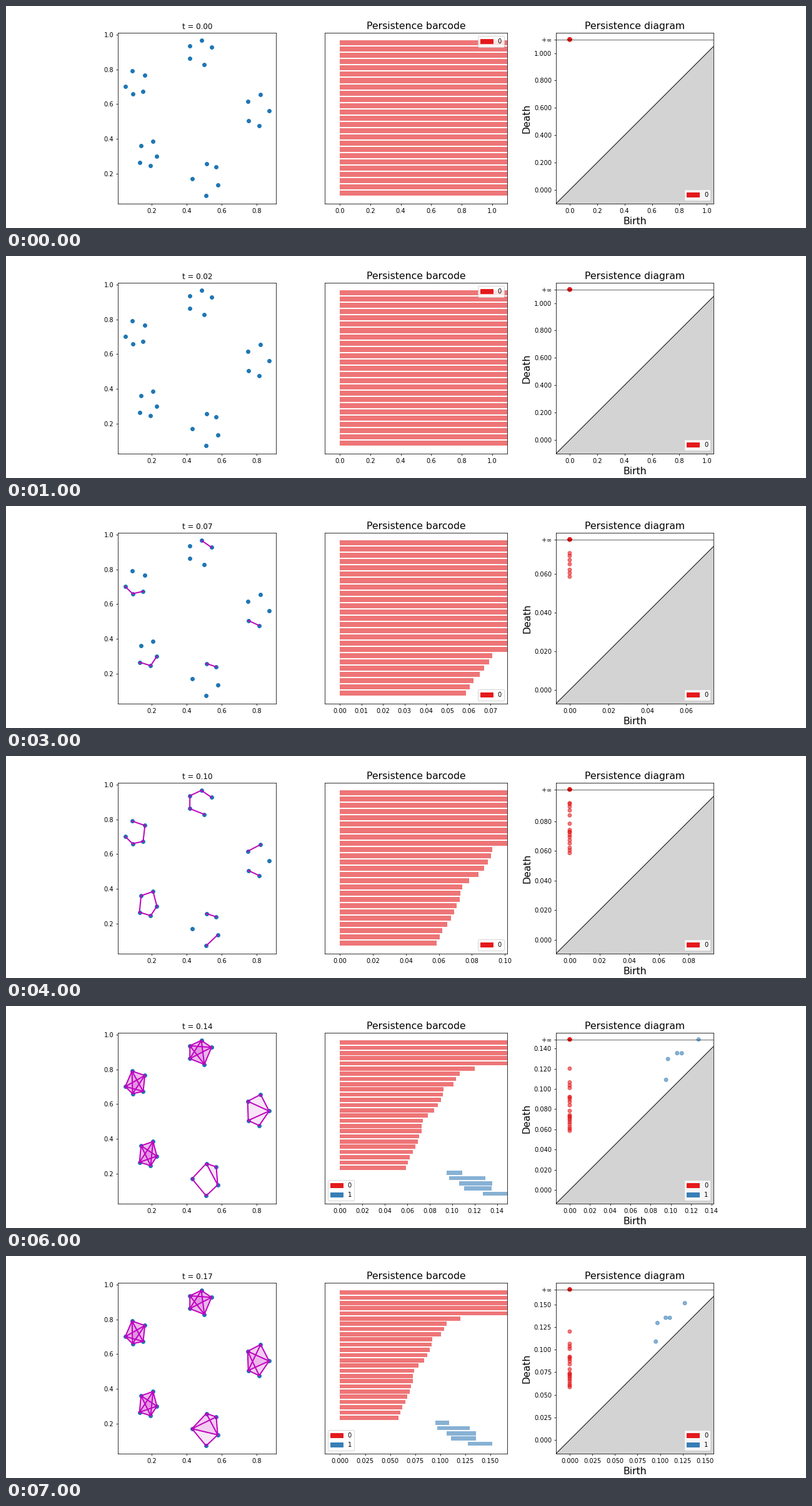
A matplotlib script that plays this animation: 1280x356 px, repeating every 8 s.

```python
from itertools import combinations

import matplotlib.pyplot as plt
import numpy as np
from matplotlib.animation import FuncAnimation
from matplotlib.patches import Patch, Polygon

plt.rcParams["font.family"] = "DejaVu Sans"

WIDTH, HEIGHT = 1280, 356
DPI = WIDTH / 18
STEP = 0.0241
FRAMES = 8
COLORS = plt.cm.Set1.colors

# Five rings of five points, each listed around its ring; all else follows from them
RINGS = np.array([
    [(.0856, .7899), (.1598, .7648), (.1497, .6732), (.0890, .6600), (.0470, .7008)],
    [(.4837, .9664), (.5420, .9264), (.5010, .8284), (.4175, .8614), (.4180, .9355)],
    [(.8240, .6550), (.8725, .5601), (.8158, .4765), (.7530, .5058), (.7494, .6165)],
    [(.2065, .3846), (.2287, .3002), (.1928, .2460), (.1286, .2657), (.1378, .3605)],
    [(.5122, .2585), (.5693, .2388), (.5775, .1355), (.5110, .0725), (.4300, .1708)],
])
POINTS = RINGS.reshape(-1, 2)


def dist(a, b):
    return np.hypot(*(a - b))


def merge_scales(points):
    """Scales at which components join: the edges of a minimum spanning tree."""
    group = list(range(len(points)))
    scales = []
    pairs = combinations(range(len(points)), 2)
    for i, j in sorted(pairs, key=lambda p: dist(*points[list(p)])):
        old, new = group[i], group[j]
        if old != new:
            scales.append(dist(points[i], points[j]))
            group = [new if g == old else g for g in group]
    return scales


def loop_life(ring):
    """A ring closes with its longest side and dies once a vertex fans across it."""
    birth = max(dist(ring[k], ring[k - 1]) for k in range(5))
    death = min(max(dist(ring[k], ring[k - 2]), dist(ring[k], ring[k - 3]))
                for k in range(5))
    return birth, death


MERGES = merge_scales(POINTS)
LOOPS = sorted(map(loop_life, RINGS), reverse=True)


def simplices(ring, size, t):
    """Vertex sets of the Rips complex with every edge no longer than t."""
    for idx in combinations(range(len(ring)), size):
        verts = ring[list(idx)]
        if all(dist(a, b) <= t for a, b in combinations(verts, 2)):
            yield verts


def intervals(t):
    """Intervals (dim, birth, death) known at scale t, from bottom bar to top."""
    def cut(death):
        return death if death <= t else np.inf

    bars = []
    # Loops are only tracked once the complex contains a triangle
    if any(list(simplices(ring, 3, t)) for ring in RINGS):
        bars += [(1, b, cut(d)) for b, d in LOOPS if b <= t]
    return bars + [(0, 0.0, cut(d)) for d in MERGES + [np.inf]]


def legend(ax, dims, loc):
    ax.legend(handles=[Patch(color=COLORS[d], label=str(d)) for d in dims], loc=loc)


def draw_complex(ax, t):
    ax.scatter(*POINTS.T)
    ax.set_xlim(ax.get_xlim())
    ax.set_ylim(ax.get_ylim())
    for ring in RINGS:
        for edge in simplices(ring, 2, t):
            ax.plot(*edge.T, color="m", lw=2)
        for tri in simplices(ring, 3, t):
            ax.add_patch(Polygon(tri, color="m", alpha=0.1, lw=0))
    ax.set_aspect("equal")
    ax.set_title(f"t = {t:.2f}")


def draw_barcode(ax, bars, dims, top):
    inf = 1.1 * top
    left = [b for _, b, _ in bars]
    width = [min(d, inf) - b for _, b, d in bars]
    ax.barh(range(len(bars)), width, left=left, alpha=0.6, linewidth=0,
            color=[COLORS[k] for k, _, _ in bars])
    if 1 in dims:
        loc = "lower left"
    else:
        loc = "upper right" if top == 1 else "lower right"
    legend(ax, dims, loc)
    ax.set_yticks([])
    ax.set_xlim(-0.1 * top, inf)
    ax.set_title("Persistence barcode", fontsize=16)


def draw_diagram(ax, bars, dims, top):
    delta = 0.1 * top
    start, end, inf = -delta, top + delta / 2, top + delta
    ax.add_patch(Polygon([(start, start), (end, start), (end, end)], color="lightgrey"))
    ax.plot([start, end], [start, end], lw=1, color="k")
    ax.plot([start, end], [inf, inf], lw=1, color="k", alpha=0.6)
    ax.scatter([b for _, b, _ in bars], [min(d, inf) for _, _, d in bars],
               alpha=0.6, color=[COLORS[k] for k, _, _ in bars])
    ticks = [y for y in ax.get_yticks() if start <= y < end]
    ax.set_yticks(ticks + [inf], [f"{abs(y):.3f}" for y in ticks] + [r"$+\infty$"])
    legend(ax, dims, "lower right")
    ax.set_xlim(start, end)
    ax.set_ylim(start, inf + delta / 2)
    ax.set_aspect("equal")
    ax.set_xlabel("Birth", fontsize=16)
    ax.set_ylabel("Death", fontsize=16)
    ax.set_title("Persistence diagram", fontsize=16)


# The sliver keeps rounding from costing a pixel row or column
size = (np.array([WIDTH, HEIGHT]) + 1e-6) / DPI
fig, axes = plt.subplots(1, 3, figsize=size, dpi=DPI)


def update(frame):
    t = STEP * frame
    bars = intervals(t)
    dims = sorted({k for k, _, _ in bars})
    top = max((d for _, _, d in bars if np.isfinite(d)), default=1)
    for ax in axes:
        ax.clear()
    draw_complex(axes[0], t)
    draw_barcode(axes[1], bars, dims, top)
    draw_diagram(axes[2], bars, dims, top)
    return []


anim = FuncAnimation(fig, update, frames=FRAMES, interval=1000, repeat=True,
                     repeat_delay=0, init_func=lambda: [])
plt.show()
```
